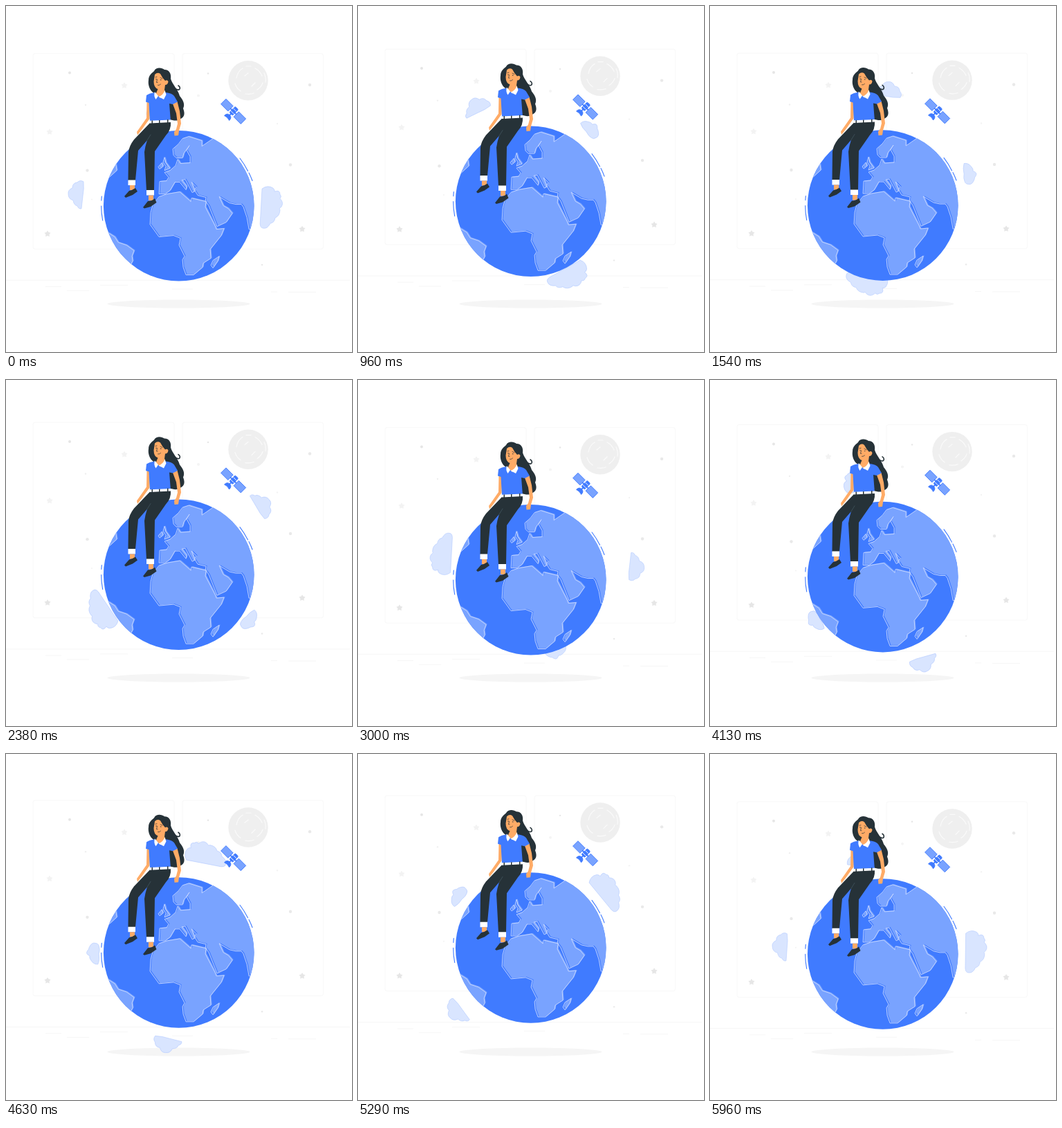
An HTML page for the animation above (6 s loop, 500x500 px).

```html
<!DOCTYPE html>
<html lang="en">
<head>
<meta charset="utf-8">
<title>Sitting on the globe</title>
<style>
  html, body { margin: 0; height: 100%; overflow: hidden; background: #fff; }
  svg { display: block; width: 100vw; height: 100vh; }
  .blue { fill: #407bff; }
  .dark { fill: #263238; }
  .skin { fill: #ffab66; }
  .white { fill: #fff; }
  .cloud { fill: #d9e5ff; stroke: #b3caff; stroke-width: .6; }
  .coast { fill: none; stroke: #c9d9ff; stroke-width: .9; }
  .land { fill: #79a3ff; }
  .line { fill: none; stroke: #407bff; stroke-width: 1.1; stroke-linecap: round; }
  .thin { fill: none; stroke: #263238; stroke-width: .7; stroke-linecap: round; }
  .panel { fill: none; stroke: #f8f8f8; }
  .ground { fill: none; stroke: #f4f4f4; stroke-width: .8; }
</style>
</head>
<body>
<svg viewBox="0 0 500 500">
  <defs>
    <clipPath id="disc"><circle cx="249.7" cy="288.7" r="108.8"/></clipPath>
    <g id="lands">
      <path d="M243 215L242 206L250 199L256 191L265 188L284 194L284 202L300 191L330 170H380V322H352L349 305L344 290L341 286L333 286L324 284L309 275L315 288L322 292L328 299L319 312L306 318L294 288L289 281L290 276L278 273L273 265L276 261L269 254L272 262L274 267L270 269L260 250L255 251L262 260L261 265L252 254L245 254L238 266L231 271L222 271L223 253L233 252L236 247L230 240L238 237L246 230L249 221L253 227L267 226L267 217L262 208L266 201L258 212L256 219L247 219Z"/>
      <path d="M222 275L234 271L252 268L268 282L269 277L290 282L289 290L303 317L305 322L316 321L312 331L296 351L297 364L286 371L285 377L272 388L261 388L257 377L256 366L259 361L251 345L253 335L243 331L222 333L209 315L210 298L213 287Z"/>
      <path d="M309 361L307 368L300 378L297 374L300 367Z"/>
      <path d="M230 218L232 226L238 234L230 237L232 231L228 225ZM221 232L226 226L228 231L223 235Z"/>
      <path d="M140 322L150 328L158 333L163 341L175 345L186 353L183 361L184 368L179 377L170 390H130Z"/>
      <path d="M159 224L161 237L150 247L130 252V220Z"/>
    </g>
  </defs>

  <ellipse cx="249.5" cy="430.5" rx="103" ry="6" fill="#f5f5f5"/>

  <g id="back">
    <rect class="panel" x="39" y="68.7" width="204" height="282.5" rx="3"/>
    <rect class="panel" x="255" y="68.7" width="203.5" height="282.5" rx="3"/>
    <path class="ground" d="M0 396.3H497M57 405.6H80M88 411.4H120M136 403.4H176M240 409H270M383 413H392M408 413.5H448"/>
    <g id="sky"></g>
    <circle cx="350" cy="107.7" r="28.7" fill="#efefef"/>
    <path d="M333 104Q335 94 342 90M347 87H354M360 90Q367 94 370 101M331 112Q333 119 339 123M346 127Q353 128 358 126M363 121Q369 117 371 111M345 101L350 97M355 116L360 111M373 97Q376 103 375 110" fill="none" stroke="#fafafa" stroke-width="1.2" stroke-linecap="round"/>
  </g>

  <g id="clouds">
    <path class="cloud" d="M112 254Q107 251 103 255Q96 256 96 263Q89 266 90 272Q90 279 97 281Q98 288 103 289Q105 294 109 293Q110 284 111 275Q113 264 112 254Z"/>
    <path class="cloud" d="M370 264Q378 258 386 263Q389 266 388 268Q396 265 396 272Q399 275 396 278Q402 284 398 290Q394 293 396 294Q396 303 389 306Q388 313 382 314Q378 322 372 321Q366 321 367.5 310Z"/>
    <path class="cloud" transform="rotate(-92.4 251 271)" d="M366 228Q372 227 376 232Q380 236 379 239Q386 241 383 246Q381 248 381 251Q378 259 373 258Q368 258 367 254Q365 250 366 243Q364 235 366 228Z"/>
  </g>

  <g id="front">
    <!-- satellite, its axis pointing up and right -->
    <g transform="translate(328.6 152.4) rotate(-45)" stroke="#407bff" stroke-width=".9">
      <path class="land" d="M-5.200 -20.300H5.200V-5.800H-5.200ZM-5.200 5.800H5.200V20.300H-5.200Z"/>
      <path d="M0 -6V6M-9 0H-4" stroke-width="1.8"/>
      <rect class="blue" x="-5" y="-3.200" width="12" height="6.400" rx="1.800"/>
      <path class="blue" d="M-13.500 -5Q-7.500 -5 -7.500 0Q-7.500 5 -13.500 5Q-11.500 0 -13.500 -5Z"/>
      <path d="M-2 -3V3M3 -3V3" stroke="#fff"/>
    </g>

    <!-- globe -->
    <circle class="blue" cx="249.7" cy="288.7" r="108.8"/>
    <g clip-path="url(#disc)">
      <use href="#lands" class="land" transform="translate(.6 -.3)"/>
      <use href="#lands" class="coast" transform="translate(-.9 .6)"/>
    </g>
    <path class="line" d="M138.300 275L137.900 281M137.700 289A112 112 0 0 0 139.700 310M338 220A112 112 0 0 1 349.500 238.500M351 241A112 112 0 0 1 356 252.500"/>

    <!-- seated woman -->
    <path class="dark" d="M206 107C206 100 211 97 214 94C217 88 225 89 229 92C236 92 239 98 238 105C240 113 249 121 251 130C256 136 259 142 256 148C260 158 256 162 250 164C247 167 241 165 236 164L234 128L214 126C207 122 205 113 206 107Z"/>
    <path d="M236 106C238 116 247 122 250 121C252 120 252 117 249 115" class="thin" style="stroke-width:1.600"/>
    <path class="skin" d="M215 99Q219 95 223 98Q226 104 230 108Q233 106 234.500 109Q234 114 230 114L229 121L231 127Q224 136 216 128L219.500 120Q213.500 118 213.500 109Z"/>
    <path class="thin" d="M216 103L218 102.500M223 103.500L226 105M218.500 106L217.500 110.500H219M219.500 114.500Q222 115 223.500 113"/>
    <circle class="dark" cx="217" cy="105.700" r=".7"/><circle class="dark" cx="223.800" cy="106.700" r=".7"/>

    <path class="skin" d="M203.500 138H208.500L207.500 163L196 179L190 186.500L189 182L203 162Z"/>
    <path class="skin" d="M240.500 140L247.500 138L251 152L253 170L250 180L249 187L243.500 187.500L243 182L246 178L248 170L246 155Z"/>
    <path class="blue" d="M203 129Q207 126 215 125L223 133L231 125Q240 126 243 130L248 138.500L241 142L236 141L238 167H208L206.500 140L202 138.500Z"/>
    <path class="white" d="M215 124L220 130L216.500 135Q213 130 215 124ZM229.500 122L231.500 128L228 135L220.500 131Q227 129 229.500 122Z"/>
    <path class="dark" d="M208 169L238 167Q239 179 231 187L215 210L214 267H203L200 211Q201 203 204 194L191 209L187 252H176.500L177 211Q178 202 185 193Z"/>
    <path class="thin" d="M204 194L209 186" style="stroke:#455a64"/>
    <path class="white" d="M208 165.800L238 164.500V168L208 169.500ZM176.500 251.500H187V259H176.500ZM203 266H214V273.500H203Z"/>
    <path class="dark" d="M210.500 165.500H212V170H210.500ZM221 165H222.500V169.500H221ZM233 164H234.500V169H233Z"/>
    <path class="skin" d="M179 259H186V266H179ZM206 273.500H213V281H206Z"/>
    <path class="dark" d="M171 275L178 267Q183 266 187 263L190 268L183 273L173 277ZM198 291L205 282Q211 282 215 278L217.500 284L209 290L200 292.500Z"/>
  </g>
</svg>
<script>
const $ = id => document.getElementById(id);

// x, y, radius, colour
const dots = [
  [92, 96.5, 2, "#e6e6e6"], [115, 143, 1.2, "#efefef"], [117.5, 237.6, 2.2, "#e9e9e9"],
  [124, 279.5, 1, "#f3f3f3"], [292, 97.5, 1.2, "#e6e6e6"], [278, 129.5, 2, "#f5f5f5"],
  [439, 114, 2.2, "#e9e9e9"], [392, 170, 1.2, "#f3f3f3"], [411, 229.5, 2.2, "#e9e9e9"],
  [370, 374, 1.2, "#e9e9e9"]
];
const stars = [
  [171, 115, "#f3f3f3"], [63, 182, "#f3f3f3"], [60, 329.3, "#e6e6e6"], [428, 322.5, "#e6e6e6"]
];

function starPoints(x, y) {
  return Array.from({ length: 10 }, (_, i) => {
    const r = i % 2 ? 2.7 : 4.8, a = i * Math.PI / 5 - Math.PI / 2;
    return `${x + r * Math.cos(a)},${y + r * Math.sin(a)}`;
  }).join(" ");
}

$("sky").innerHTML =
  dots.map(([x, y, r, c]) => `<circle cx="${x}" cy="${y}" r="${r}" fill="${c}"/>`).join("") +
  stars.map(([x, y, c]) => `<polygon points="${starPoints(x, y)}" fill="${c}"/>`).join("");

const LOOP = 6000, BOB = 1500, LIFT = 10;

function draw() {
  const t = performance.now() % LOOP;
  const phase = (t + 30) % BOB / BOB;
  const y = 0.4 - LIFT * (1 - Math.abs(2 * phase - 1));
  for (const id of ["back", "front"]) $(id).setAttribute("transform", `translate(0 ${y})`);
  $("clouds").setAttribute("transform", `rotate(${t / LOOP * 360} 251.8 271.2)`);
  requestAnimationFrame(draw);
}
draw();
</script>
</body>
</html>
```
